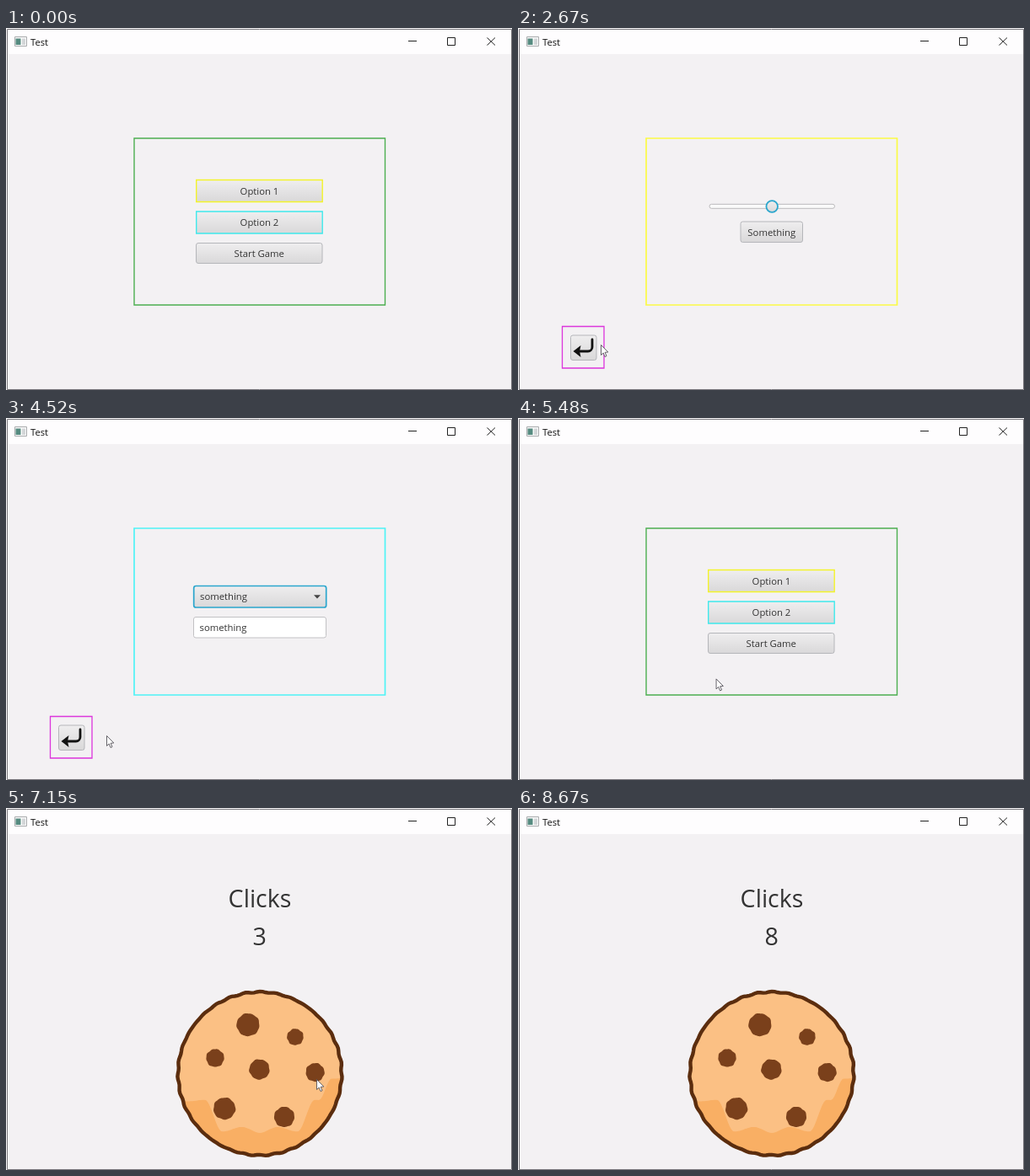
These frames come from a looping animation (600 px wide and 430 px high, 8700 ms). An HTML page with a canvas:

```html
<!DOCTYPE html>
<html lang="en">
<head>
<meta charset="utf-8">
<title>Test</title>
<style>
html, body { margin: 0; width: 100%; height: 100%; overflow: hidden; background: #f3f1f3; }
canvas { display: block; width: 600px; height: 430px; }
</style>
</head>
<body>
<canvas id="stage"></canvas>
<script>
const LOOP = 8700;
const FONT = '"Open Sans", "Noto Sans", sans-serif';
const TAU = Math.PI * 2;
const FIRST_CLICK = 6820, CLICK_GAP = 150, MAX_CLICKS = 8;

const canvas = document.getElementById('stage');
const ctx = canvas.getContext('2d');
const dpr = window.devicePixelRatio || 1;
canvas.width = 600 * dpr;
canvas.height = 430 * dpr;

const at = (x, y) => ({ x, y });
const entry = at(580, 428), exit = at(378, 432);
const option1 = at(335, 197), option2 = at(318, 234), start = at(318, 270);
const something = at(308, 243), back = at(81, 382);
const nearBack = at(98, 376), besideBack = at(119, 377);
const cookieEdge = at(375, 347), cookieSpot = at(368, 322);

const screens = [
  { from: 0, draw: drawMenu },
  { from: 1390, draw: drawSlider },
  { from: 3090, draw: drawMenu },
  { from: 4120, draw: drawFields },
  { from: 5060, draw: drawMenu },
  { from: 5940, draw: drawGame }
];

// The pointer rests between moves
const moves = [
  { from: 30, to: 880, goal: option1 },
  { from: 1390, to: 2240, goal: something },
  { from: 2240, to: 2670, goal: nearBack },
  { from: 2670, to: 2910, goal: back },
  { from: 3090, to: 3790, goal: option2 },
  { from: 4120, to: 4520, goal: besideBack },
  { from: 4520, to: 4880, goal: back },
  { from: 5060, to: 5760, goal: start },
  { from: 5940, to: 6360, goal: cookieEdge },
  { from: 6360, to: 6790, goal: cookieSpot },
  { from: 7880, to: 8520, goal: exit }
];

const clamp = u => Math.max(0, Math.min(1, u));
const ease = u => u * u * (3 - 2 * u);
const step = (a, b, v) => ease(clamp((v - a) / (b - a)));

function pointerAt(t) {
  if (t < moves[0].from || t >= moves.at(-1).to) return null;
  let pos = entry;
  for (const { from, to, goal } of moves) {
    const u = step(from, to, t);
    pos = at(pos.x + (goal.x - pos.x) * u, pos.y + (goal.y - pos.y) * u);
  }
  return pos;
}

function text(str, x, y, size, align = 'center', color = '#333') {
  ctx.font = `${size}px ${FONT}`;
  ctx.textAlign = align;
  ctx.fillStyle = color;
  ctx.fillText(str, x, y);
}

function fill(color) {
  ctx.fillStyle = color;
  ctx.fill();
}

function stroke(color, width) {
  ctx.strokeStyle = color;
  ctx.lineWidth = width;
  ctx.stroke();
}

function frame(x, y, w, h, color, width = 1.4) {
  ctx.beginPath();
  ctx.rect(x, y, w, h);
  stroke(color, width);
}

function roundBox(x, y, w, h, r, paint, border, width = 1) {
  ctx.beginPath();
  ctx.roundRect(x, y, w, h, r);
  fill(paint);
  stroke(border, width);
}

function polygon(points) {
  ctx.beginPath();
  for (const [x, y] of points) ctx.lineTo(x, y);
  ctx.closePath();
}

function shade(y, h, hover) {
  const g = ctx.createLinearGradient(0, y, 0, y + h);
  g.addColorStop(0, hover ? '#f8f8f8' : '#efeeef');
  g.addColorStop(1, hover ? '#e6e6e6' : '#d9d8d9');
  return g;
}

function button(label, x, y, w, h, p, border) {
  const hover = p && p.x > x && p.x < x + w && p.y > y && p.y < y + h;
  roundBox(x, y, w, h, border ? 0 : 2.5, shade(y, h, hover), border || '#b5b6ba', border ? 1.4 : 1);
  text(label, x + w / 2, y + h / 2 + 4.3, 11.3);
}

function pane(color, width) {
  frame(152, 131, 297.5, 198, color, width);
}

function drawMenu(p) {
  pane('#4caf50');
  button('Option 1', 225.7, 180.5, 149.5, 26, p, '#f3f32b');
  button('Option 2', 225.7, 218, 149.5, 26, p, '#3fe9ec');
  button('Start Game', 225.5, 255.5, 149.5, 24, p);
}

function drawBack(p) {
  frame(52.5, 354.5, 49.5, 49.5, '#dc35dc', 1.3);
  button('', 62.5, 365, 30.5, 29.5, p);
  ctx.lineCap = 'round';
  ctx.beginPath();
  ctx.moveTo(88, 370);
  ctx.arcTo(88, 384, 69, 384, 5);
  ctx.lineTo(69, 384);
  stroke('#111', 2.8);
  ctx.lineCap = 'butt';
  polygon([[65.5, 384], [74.5, 377], [73, 384], [74.5, 391]]);
  fill('#111');
}

function drawSlider(p) {
  pane('#fbfb45', 1.7);
  roundBox(227, 209.3, 148.5, 5, 2.5, '#fafafa', '#bbbabc');
  ctx.beginPath();
  ctx.arc(301.2, 212, 6.8, 0, TAU);
  fill(shade(205, 14));
  stroke('#2ba6cd', 1.8);
  button('Something', 264, 230, 73.5, 24.5, p);
  drawBack(p);
}

function drawFields(p) {
  pane('#4ff4f6', 1.7);
  roundBox(222.7, 199.5, 157, 25.5, 2.5, shade(199, 26), '#2ba6cd', 1.7);
  text('something', 230, 216, 11.3, 'left');
  polygon([[365, 210.3], [373, 210.3], [369, 214.5]]);
  fill('#444');
  roundBox(222.5, 236.5, 157, 24.5, 2.5, '#fff', '#c2c1c4');
  text('something', 229.5, 253, 11.3, 'left');
  drawBack(p);
}

// Hand-drawn circle: a radius with two small ripples
function blob(x, y, r, wobble, bumps) {
  const pts = [];
  for (let a = 0; a < TAU; a += TAU / 180) {
    const d = r + wobble * (Math.sin(bumps * a + x) + Math.sin((bumps + 4) * a)) / 2;
    pts.push([x + d * Math.cos(a), y + d * Math.sin(a)]);
  }
  polygon(pts);
}

// Upper edge of the darker dough, with u from -1 (left) to 1 (right)
function doughEdge(u) {
  const sides = 34 * step(0.45, 0.65, Math.abs(u));
  const rightStep = 27 * step(0.7, 0.85, u);
  return 382 - sides - rightStep + 4 * (1 - Math.abs(u)) * Math.cos(14 * u);
}

function chip(x, y, r) {
  blob(x, y, r, 0.5, 5);
  fill('#7a401b');
}

function drawCookie() {
  const x = 301, y = 315.5, r = 97;
  blob(x, y, r, 0.7, 31);
  fill('#fbc084');
  ctx.save();
  ctx.clip();
  const dough = [[x + 100, 420], [x - 100, 420]];
  for (let u = -1; u <= 1; u += 0.02) dough.push([x + 100 * u, doughEdge(u)]);
  polygon(dough);
  fill('#f9af64');
  ctx.restore();
  blob(x, y, r, 0.7, 31);
  stroke('#5b2d0e', 4.4);

  chip(287, 257.5, 13.5);
  chip(343, 272, 9.7);
  chip(248, 297, 10.6);
  chip(300.5, 310.5, 12);
  chip(366.5, 314, 11);
  chip(259, 357, 13);
  chip(330, 367, 12);
}

function drawGame(p, t) {
  const clicks = Math.floor((t - FIRST_CLICK) / CLICK_GAP) + 1;
  text('Clicks', 301, 118, 28.6);
  text(Math.max(0, Math.min(MAX_CLICKS, clicks)), 300.7, 163, 28.6);
  drawCookie();
}

function rect(x, y, w, h, color) {
  ctx.fillStyle = color;
  ctx.fillRect(x, y, w, h);
}

function drawWindow() {
  rect(0, 0, 600, 430, '#f3f1f3');
  rect(0, 0, 600, 31, '#fefdfe');
  rect(0, 0, 1, 430, '#fefdfe');
  frame(1.5, 1.5, 598, 428, '#77757a', 1);

  // Title icon
  rect(10, 10, 15, 12, '#fafafa');
  frame(10.5, 10.5, 14, 11, '#a9abad', 1);
  rect(11.5, 12.5, 6, 7.5, '#568b80');
  rect(19, 12.5, 4, 7.5, '#d3d6d8');
  text('Test', 29, 20.8, 11.2, 'left', '#111');

  // Window controls
  ctx.beginPath();
  ctx.moveTo(477, 15.5);
  ctx.lineTo(487, 15.5);
  ctx.moveTo(570.5, 11.5);
  ctx.lineTo(580, 20.5);
  ctx.moveTo(580, 11.5);
  ctx.lineTo(570.5, 20.5);
  stroke('#222', 1);
  frame(523.5, 11.5, 9, 9, '#222', 1);
}

function drawPointer({ x, y }) {
  ctx.save();
  ctx.translate(x, y);
  polygon([[0.5, 0.5], [0.5, 12.5], [3.2, 10], [5, 14.5], [7, 13.6], [5.1, 9.3], [8.8, 9]]);
  fill('#fff');
  stroke('#55535a', 0.9);
  ctx.restore();
}

function render(now) {
  const t = now % LOOP;
  const p = pointerAt(t);
  ctx.setTransform(dpr, 0, 0, dpr, 0, 0);
  drawWindow();
  screens.findLast(s => t >= s.from).draw(p, t);
  if (p) drawPointer(p);
}

let begin;
function tick(now) {
  begin ??= now;
  render(now - begin);
  requestAnimationFrame(tick);
}
render(0);
requestAnimationFrame(tick);
</script>
</body>
</html>
```
